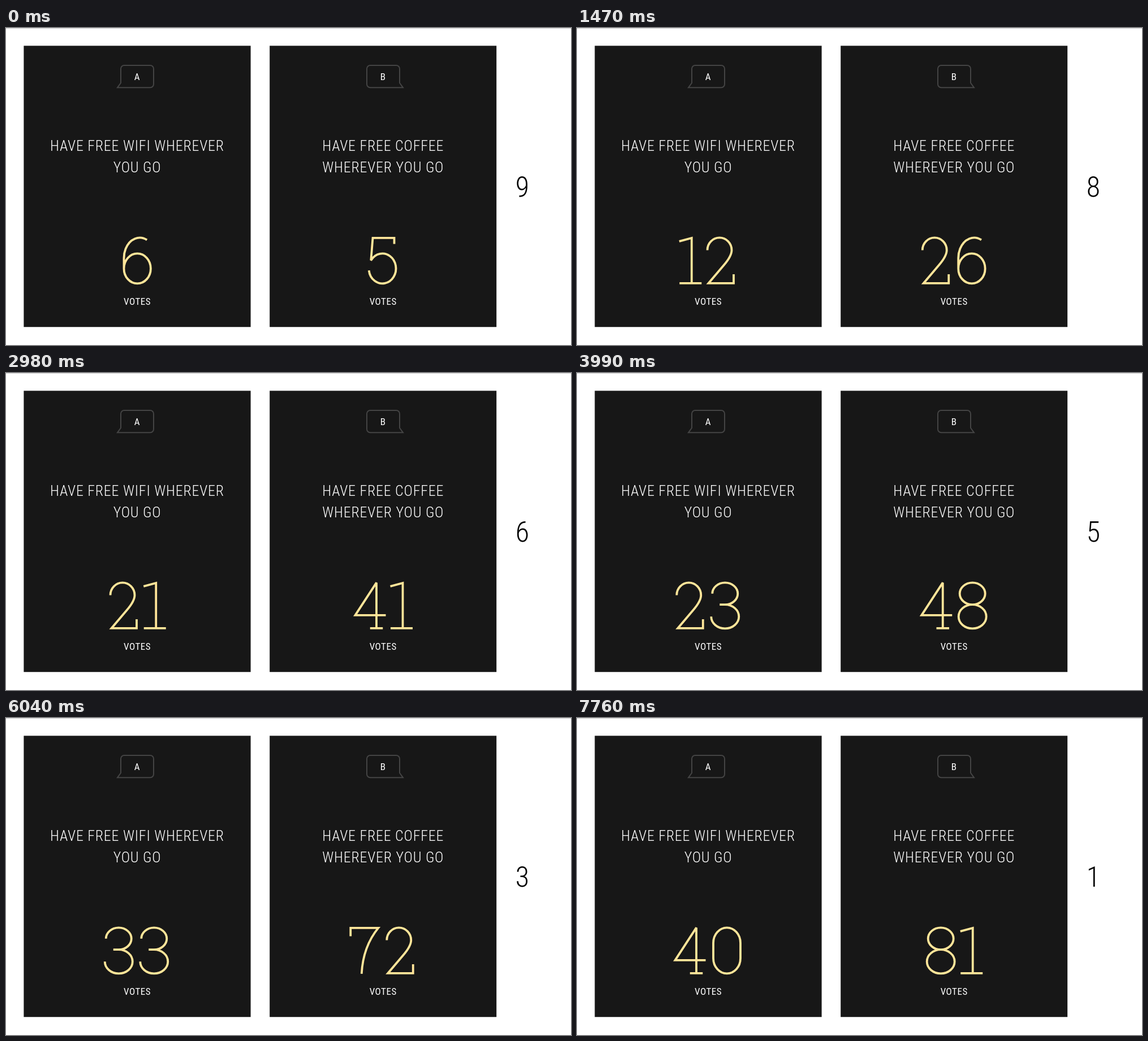
An HTML page with a canvas for the animation above (8 s loop, 999x560 px).

```html
<!DOCTYPE html>
<html lang="en">
<head>
<meta charset="utf-8">
<title>Vote countdown</title>
<style>
  html, body { margin: 0; width: 100%; height: 100%; overflow: hidden; background: #fff; }
  canvas, svg { position: absolute; left: 0; top: 0; width: 999px; height: 560px; }
  text {
    font-family: "Roboto Condensed", Roboto, sans-serif;
    font-stretch: 75%;
    letter-spacing: .03em;
    text-anchor: middle;
    fill: #fff;
  }
  .title { font-size: 26px; font-weight: 340; }
  .label { font-size: 17px; font-weight: 400; }
  #clock { font-size: 50px; font-weight: 300; letter-spacing: 0; fill: #000; }
</style>
</head>
<body>
<canvas width="999" height="560"></canvas>
<svg viewBox="0 0 999 560">
  <g transform="translate(232)">
    <text class="label" y="92.3">A</text>
    <text class="title" y="217">HAVE FREE WIFI WHEREVER</text>
    <text class="title" y="254.5">YOU GO</text>
    <text class="label" y="489">VOTES</text>
  </g>
  <g transform="translate(666.7)">
    <text class="label" y="92.3">B</text>
    <text class="title" y="217">HAVE FREE COFFEE</text>
    <text class="title" y="254.5">WHEREVER YOU GO</text>
    <text class="label" y="489">VOTES</text>
  </g>
  <text id="clock" x="913" y="298">9</text>
</svg>
<script>
const LOOP = 8000;
const ctx = document.querySelector('canvas').getContext('2d');
const clock = document.getElementById('clock');

// Numeral metrics: height, baseline slab, and the two stacked lobes of 3 and 8.
const H = 81, TOP = .5, BASE = H - .5;
const UPPER = 19.4, LOWER = H / 2 - UPPER / 2 + 9.7 - UPPER / 2 + 9.7 - UPPER + UPPER / 2 - 9.6;

function line(x, y, ...rest) {
  ctx.moveTo(x, y);
  for (let i = 0; i < rest.length; i += 2) ctx.lineTo(rest[i], rest[i + 1]);
}

// Angles are in units of pi.
function arc(x, y, rx, ry, from, to, back = false) {
  ctx.ellipse(x, y, rx, ry, 0, from * Math.PI, to * Math.PI, back);
}

const slab = (x, half) => line(x - half, BASE, x + half, BASE);
const waist = 2 * UPPER;
const lowerRadius = (H - waist) / 2;
const upperLobe = (x, from, to) => arc(x, UPPER, 22.5, UPPER, from, to);
const lowerLobe = (x, from, to) => arc(x, waist + lowerRadius, 24.5, lowerRadius, from, to);

// Centre lines of thin slab numerals, drawn around x = 0.
const numerals = {
  0() { ctx.roundRect(-24, 0, 48, H, { x: 24, y: 27 }); },
  1() {
    line(-20, 6.5, 2, TOP, 2, BASE);
    slab(0, 19.5);
  },
  2() {
    arc(-3, 22, 21.5, 22, 1, 2);
    ctx.bezierCurveTo(18.5, 31, 11, 41, 5, 48);
    ctx.lineTo(-22.5, BASE);
    ctx.lineTo(22, BASE);
    ctx.lineTo(22, BASE - 16);
  },
  3() {
    upperLobe(-1.5, 1, 2.5);
    ctx.lineTo(-11, waist);
    ctx.moveTo(-1.5, waist);
    lowerLobe(-1.5, 1.5, 3);
  },
  4() {
    line(28, 57.5, -26, 57.5, 11.5, 0, 11.5, BASE);
    slab(11.5, 11.25);
  },
  5() {
    line(20, 11, 20, TOP, -18, TOP, -21.2, 40);
    arc(-1, 54.5, 24, 26.5, 1.19, 2.96);
  },
  6() {
    arc(4.5, 36, 28, 36, 1.65, 1, true);
    arc(.2, 54.5, 23.7, 26.5, 1, -1, true);
  },
  7() {
    line(-26, 15, -26, TOP, 23, TOP);
    ctx.quadraticCurveTo(-4, 33.5, -6.5, H + TOP);
  },
  8() {
    upperLobe(-.3, .5, 2.5);
    lowerLobe(-.3, 1.5, 3.5);
  },
  9() {
    ctx.translate(0, H);
    ctx.rotate(Math.PI);
    numerals[6]();
  }
};

const advance = digit => ({ 0: 65, 1: 46, 4: 66 })[digit] ?? 62.5;

function drawVotes(value, center) {
  const digits = [...String(value)];
  let x = center - digits.reduce((sum, d) => sum + advance(d), 0) / 2;
  ctx.strokeStyle = '#ffe599';
  ctx.lineWidth = 3.8;
  ctx.miterLimit = 3;
  for (const d of digits) {
    ctx.save();
    ctx.translate(x + advance(d) / 2, 370.4);
    ctx.beginPath();
    numerals[d]();
    ctx.stroke();
    ctx.restore();
    x += advance(d);
  }
}

function drawBubble(center, flip) {
  ctx.save();
  ctx.translate(center, 66);
  ctx.scale(flip, 1);
  ctx.beginPath();
  ctx.moveTo(-35, 39.3);
  ctx.arcTo(29, 39.3, 29, 0, 6);
  ctx.arcTo(29, 0, -29, 0, 6);
  ctx.arcTo(-29, 0, -29, 31, 6);
  ctx.lineTo(-29, 31);
  ctx.closePath();
  ctx.strokeStyle = '#444';
  ctx.lineWidth = 2;
  ctx.stroke();
  ctx.restore();
}

// Poll tallies: step, votes for A, votes for B; linear in between.
const tallies = [[0, 6, 5], [3, 12, 26], [5, 20, 37], [8, 23, 48],
                 [10, 27, 60], [12, 33, 72], [15, 40, 81]];

function votesAt(step) {
  const i = Math.max(1, tallies.findIndex(([s]) => s >= step));
  const [from, to] = [tallies[i - 1], tallies[i]];
  const part = (step - from[0]) / (to[0] - from[0]);
  return [1, 2].map(k => Math.round(from[k] + (to[k] - from[k]) * part));
}

// Number of ticks so far, for a first tick and a period in ms.
const ticks = (t, first, period) => Math.max(0, Math.floor((t - first) / period) + 1);

function draw(t) {
  ctx.fillStyle = '#fff';
  ctx.fillRect(0, 0, 999, 560);
  ctx.fillStyle = '#ccc';
  ctx.fillRect(0, 0, 999, 1);
  ctx.fillStyle = '#171717';
  ctx.fillRect(31.4, 31.4, 401.2, 496.8);
  ctx.fillRect(466.2, 31.4, 401, 496.8);
  drawBubble(232, 1);
  drawBubble(667, -1);

  const [a, b] = votesAt(ticks(t, 440, 507));
  drawVotes(a, 232);
  drawVotes(b, 666.5);
  clock.textContent = 9 - ticks(t, 808, 992);
}

const start = performance.now();
function tick() {
  draw((performance.now() - start) % LOOP);
  requestAnimationFrame(tick);
}
tick();
</script>
</body>
</html>
```
